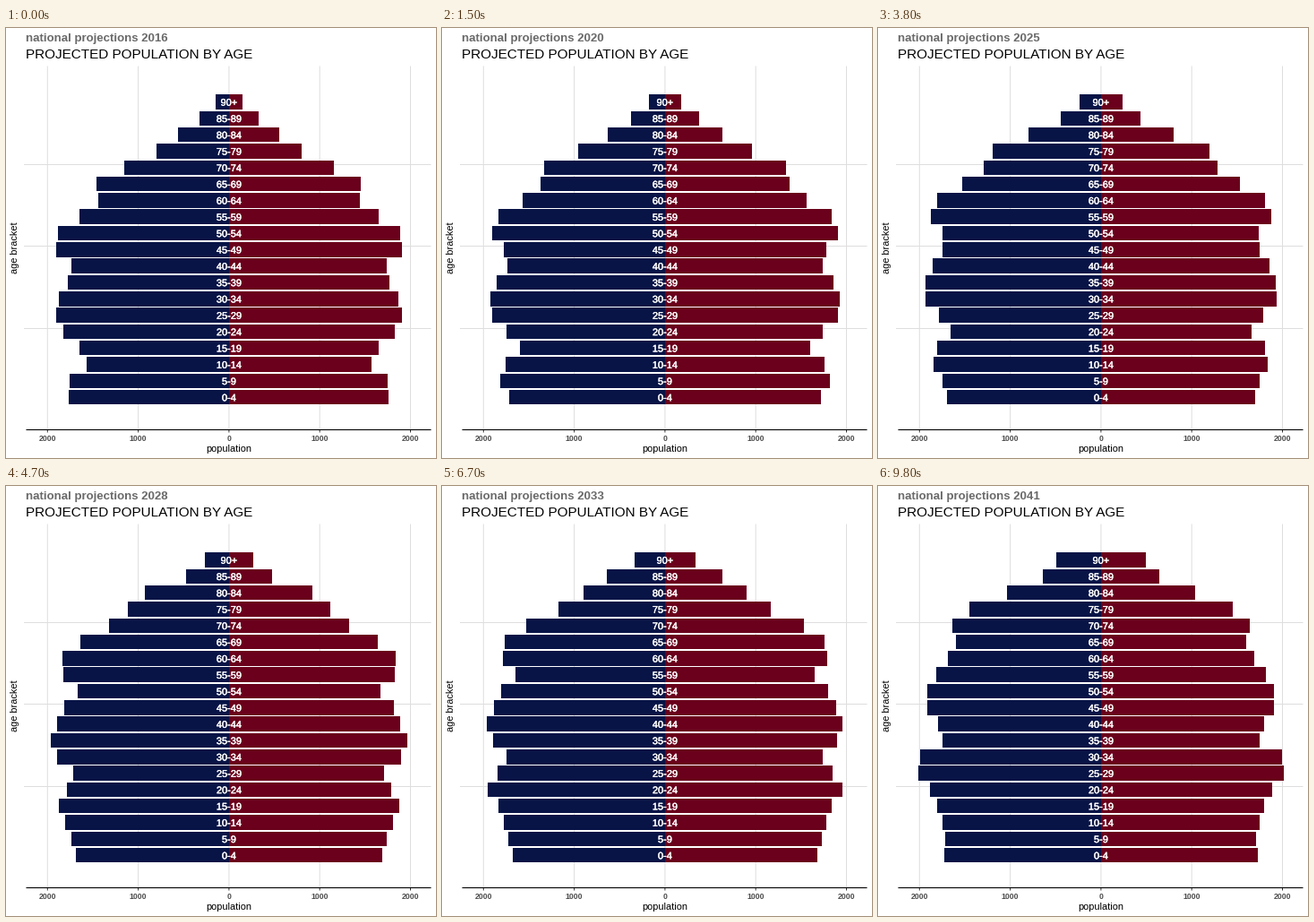
Recreate the animation shown at these times as a matplotlib script. Size 480 px wide and 480 px high, loop 10 s.

```python
import numpy as np
import matplotlib.pyplot as plt
from matplotlib.animation import FuncAnimation
from matplotlib.patheffects import withStroke

plt.rcParams["font.family"] = "Liberation Sans"

START, GROUPS = 2016, 19
CENTER, UNIT = 248.9, 0.1013          # zero line in px, px per person unit
ROW, BAR_H, BOTTOM = 18.315, 16.47, 420.4
LEFT, RIGHT, TOP, AXIS_Y = 22.5, 474.5, 42.5, 448.5
NAVY, MAROON, GRID = "#081446", "#6a001b", "#dedede"

# Turning points of the birth curve: year and cohort size in px of bar.
BIRTHS = np.array([
    (1931, 67), (1943, 97), (1948, 131.5), (1951, 139), (1953, 128.5),
    (1958, 135), (1965.5, 167), (1970, 169), (1973, 164), (1977.5, 146.5),
    (1983, 159.5), (1993, 171.5), (1998, 165.5), (2003, 152), (2006, 152.5),
    (2008, 164), (2012.5, 179), (2015, 180), (2019, 174), (2035, 169), (2041, 175),
])

# Log growth of a cohort between five-year groups: arrivals when young,
# then deaths that rise exponentially with age.
ages = np.arange(GROUPS - 1)
arrivals = np.interp(ages, [0, 2, 3.4, 6], [0.02, 0.02, 0.045, 0])
deaths = np.where(ages < 6, 0, 0.37 * np.exp(0.56 * (ages - 16)))
survival = np.exp(np.append(0, np.cumsum(arrivals - deaths)[:-1]))


def bar_widths(year):
    cohorts = np.interp(year - 5 * ages, *BIRTHS.T)
    oldest = 15 * np.exp(0.048 * (year - START))
    return np.append(cohorts * survival, oldest)


fig = plt.figure(figsize=(480 / 72, 480 / 72), dpi=72, facecolor="white")
ax = fig.add_axes([0, 0, 1, 1])
ax.set(xlim=(0, 480), ylim=(480, 0))
ax.axis("off")


def label(x, y, text, size, color="black", **kw):
    kw = {"ha": "center", "va": "baseline", **kw}
    return ax.text(x, y, text, fontsize=size, color=color, **kw)


def line(x0, y0, x1, y1, color, lw=1, zorder=1):
    ax.plot([x0, x1], [y0, y1], color=color, lw=lw, zorder=zorder,
            snap=False, solid_capstyle="butt")


for y in (152.5, 243.5, 335.5):
    line(20, y, RIGHT, y, GRID)
for value in range(-2000, 2001, 1000):
    x = CENTER + value * UNIT
    line(x, TOP, x, AXIS_Y, GRID)
    line(x, AXIS_Y, x, AXIS_Y + 3, "#333333", zorder=2)
    label(x, 461, str(abs(value)), 8.8, "#4d4d4d", weight="bold")
line(LEFT, AXIS_Y, RIGHT, AXIS_Y, "black", 1.1, 3)

title = label(22.5, 15, "", 13.2, "#6a6a6a", weight="bold", ha="left")
label(22, 34.3, "PROJECTED POPULATION BY AGE", 15.2, ha="left")
label(CENTER, 473, "population", 11)
label(15, 245.2, "age bracket", 11, rotation=90, ha="right", va="center")

tops = BOTTOM - BAR_H - ROW * np.arange(GROUPS)
men, women = (
    ax.barh(tops, 0, BAR_H, left=CENTER, align="edge", color=color, lw=0, zorder=4)
    for color in (NAVY, MAROON)
)
for g, top in enumerate(tops):
    name = "90+" if g == GROUPS - 1 else f"{5 * g}-{5 * g + 4}"
    label(CENTER, top + BAR_H / 2 + 4.2, name, 11, "white", zorder=5,
          path_effects=[withStroke(linewidth=0.35, foreground="white")])


def position(frame):
    """Years since the start; one halfway step between two held years."""
    if frame >= 97:                   # the last year arrives one step early
        frame += 1
    year, phase = divmod(frame + 2, 4)
    return year - 0.5 if phase == 0 else float(year)


def update(frame):
    pos = START + position(frame)
    year = int(pos)
    widths = (bar_widths(year) + bar_widths(np.ceil(pos))) / 2
    for left, right, width in zip(men, women, widths):
        left.set_width(-width)
        right.set_width(width)
    title.set_text(f"national projections {year}")


anim = FuncAnimation(fig, update, frames=100, interval=100, repeat=True, repeat_delay=0)
plt.show()
```
